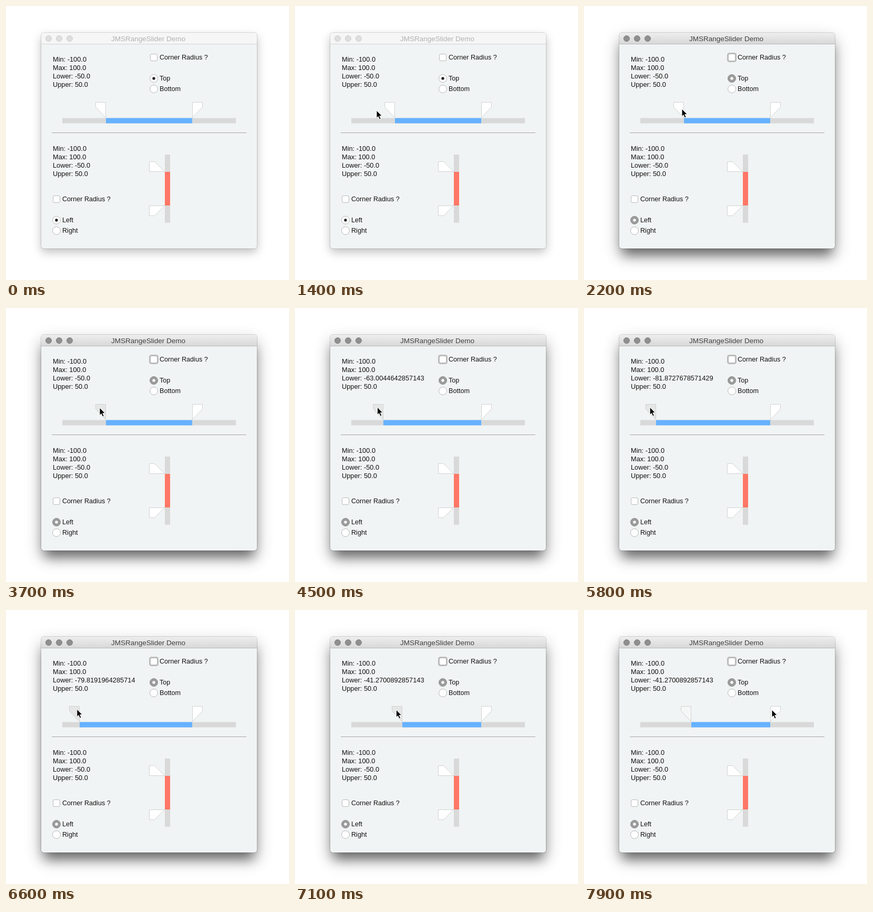
Recreate the animation shown at these times as an HTML page. Size 538 px wide and 522 px high, loop 8000 ms.

```html
<!DOCTYPE html>
<html lang="en">
<head>
<meta charset="utf-8">
<title>Range slider demo</title>
<style>
html, body { margin: 0; width: 100%; height: 100%; overflow: hidden; background: #fff; }
#window { position: absolute; left: 67px; top: 51px; width: 410px; height: 411px; border-radius: 5px; background: #f1f4f4;
  box-shadow: 0 0 0 1px rgba(0,0,0,.13), 0 7px 18px rgba(0,0,0,.25); }
#bar { height: 21px; border-radius: 5px 5px 0 0; background: #f6f6f6; border-bottom: 1px solid #d4d4d4; }
.active #window { box-shadow: 0 0 0 1px rgba(0,0,0,.15), 0 18px 22px -6px rgba(0,0,0,.5), 0 12px 32px rgba(0,0,0,.24); }
.active #bar { background: linear-gradient(#eee, #d8d8d8); border-color: #b9b9b9; }
svg { position: absolute; left: 0; top: 0; }
text { font: 12.6px "Liberation Sans", Arial, sans-serif; fill: #111; white-space: pre; }
.info { font-size: 12.8px; }
#title { font-size: 13.5px; text-anchor: middle; fill: #b2b2b2; }
.active #title { fill: #404040; }
.light { fill: #dedede; stroke: #cecece; }
.active .light { fill: #8f8f8f; stroke: #7d7d7d; }
.box { fill: #fff; stroke: #b9b9b9; }
.dot { fill: #222; }
.active .on { fill: #9b9b9b; stroke: #929292; }
.active .dot { fill: #fff; }
#focus { fill: #bcbcbc; visibility: hidden; }
.active #focus { visibility: visible; }
.track { fill: #d9d9d9; }
.knob { fill: #fff; stroke: #d2d2d2; }
</style>
</head>
<body>
<div id="window"><div id="bar"></div></div>
<svg id="stage" width="538" height="522"></svg>
<script>
const LOOP = 8000, STEP = 100;
const PX = 1.65, GRAB = 178, RIGHT = 354;   // pixels per slider unit, pointer x at -50, range end
const $ = id => document.getElementById(id);

const label = (x, y, s, attrs = '') => `<text x="${x}" y="${y}" ${attrs}>${s}</text>`;
const rect = (x, y, w, h, attrs) => `<rect x="${x}" y="${y}" width="${w}" height="${h}" ${attrs}/>`;
const circle = (x, y, r, cls) => `<circle cx="${x}" cy="${y}" r="${r}" class="${cls}"/>`;
const knob = (d, id = '') => `<path class="knob" id="${id}" d="${d}"/>`;
const check = (x, y) => rect(x + .5, y + .5, 13, 13, 'rx="2.5" class="box"') + label(x + 18, y + 11, 'Corner Radius ?');
const radio = (x, y, s, on) => circle(x, y, 7.5, on ? 'box on' : 'box') +
  (on ? circle(x, y, 2.7, 'dot') : '') + label(x + 11, y + 4, s);
const info = (y, id) => ['Min: -100.0', 'Max: 100.0', 'Lower: -50.0', 'Upper: 50.0']
  .map((s, i) => label(89, y + 16 * i, s, `class="info" id="${i === 2 ? id : ''}"`)).join('');

$('stage').innerHTML =
  [81, 101, 121].map(x => circle(x, 62, 5.5, 'light')).join('') +
  label(270.5, 67, 'JMSRangeSlider Demo', 'id="title"') +
  info(106, 'lower') + info(276, 'lower2') +
  rect(272, 89, 18, 18, 'rx="4.5" id="focus"') +
  check(274, 91) + check(89, 361) +
  radio(281, 138, 'Top', true) + radio(281, 158, 'Bottom') +
  radio(96, 408, 'Left', true) + radio(96, 428, 'Right') +
  rect(87, 241, 370, 1, 'fill="#a6a6a6"') +
  rect(107, 213.5, 330, 10, 'class="track"') +
  rect(190, 213.5, 164, 10, 'fill="#66b2ff" id="range"') +
  knob('M-19.5 183.5H-.5V212.5L-19.5 192.5Z', 'low') +
  knob('M373.5 183.5H354.5V212.5L373.5 192.5Z') +
  rect(302, 283, 10, 130, 'class="track"') +
  rect(302, 316, 10, 64, 'fill="#ff7766"') +
  knob('M272.5 296.5H282.5L301.5 315.5H272.5Z') +
  knob('M272.5 380.5H301.5L282.5 399.5H272.5Z') +
  '<path id="cursor" d="M0 0V14.5L3.2 11.5L5.6 17L8.2 15.9L5.8 10.5H10.3Z" fill="#000" stroke="#fff" stroke-width="1"/>';

// Pointer legs: start, end, destination.
const dragTo = value => GRAB + (value + 50) * PX;
const legs = [
  [500, 1400, 155, 199],
  [1400, 1800, 186, 196],
  [2300, 2800, GRAB, 190],
  [3900, 4400, dragTo(-63.0045), 189],
  [4500, 5100, dragTo(-80.096), 189],
  [5200, 5800, dragTo(-82), 189],
  [5900, 6400, dragTo(-79.8192), 189],
  [6500, 7000, dragTo(-41.27), 190],
  [7200, 7800, 357, 190]
];

const clamp = (v, lo, hi) => Math.min(hi, Math.max(lo, v));
const ease = p => (1 - Math.cos(Math.PI * p)) / 2;

function pointer(t) {
  let x = -12, y = 241;
  for (const [start, end, toX, toY] of legs) {
    const p = ease(clamp((t - start) / (end - start), 0, 1));
    x += (toX - x) * p;
    y += (toY - y) * p;
  }
  return { x, y };
}

function draw(t) {
  const { x, y } = pointer(t);
  // The knob trails the pointer by one step and only moves during the drag.
  const held = pointer(clamp(t - STEP, 3900, 7100)).x;
  const value = Math.round(((held - GRAB) / PX - 50) * 448) / 448;
  const edge = Math.round(107 + (value + 100) * PX);
  document.body.className = t >= 1900 ? 'active' : '';
  $('cursor').setAttribute('transform', `translate(${x} ${y})`);
  $('low').setAttribute('transform', `translate(${edge} 0)`);
  $('low').style.fill = t < 3600 ? '#fff' : t < 7200 ? '#e5e6e6' : '#f5f6f6';
  $('range').setAttribute('x', edge);
  $('range').setAttribute('width', RIGHT - edge);
  $('lower').textContent = 'Lower: ' + value.toFixed(Number.isInteger(value) ? 1 : 13);
}

function frame() {
  draw(Math.floor(performance.now() % LOOP / STEP) * STEP);
  requestAnimationFrame(frame);
}
frame();
</script>
</body>
</html>
```
